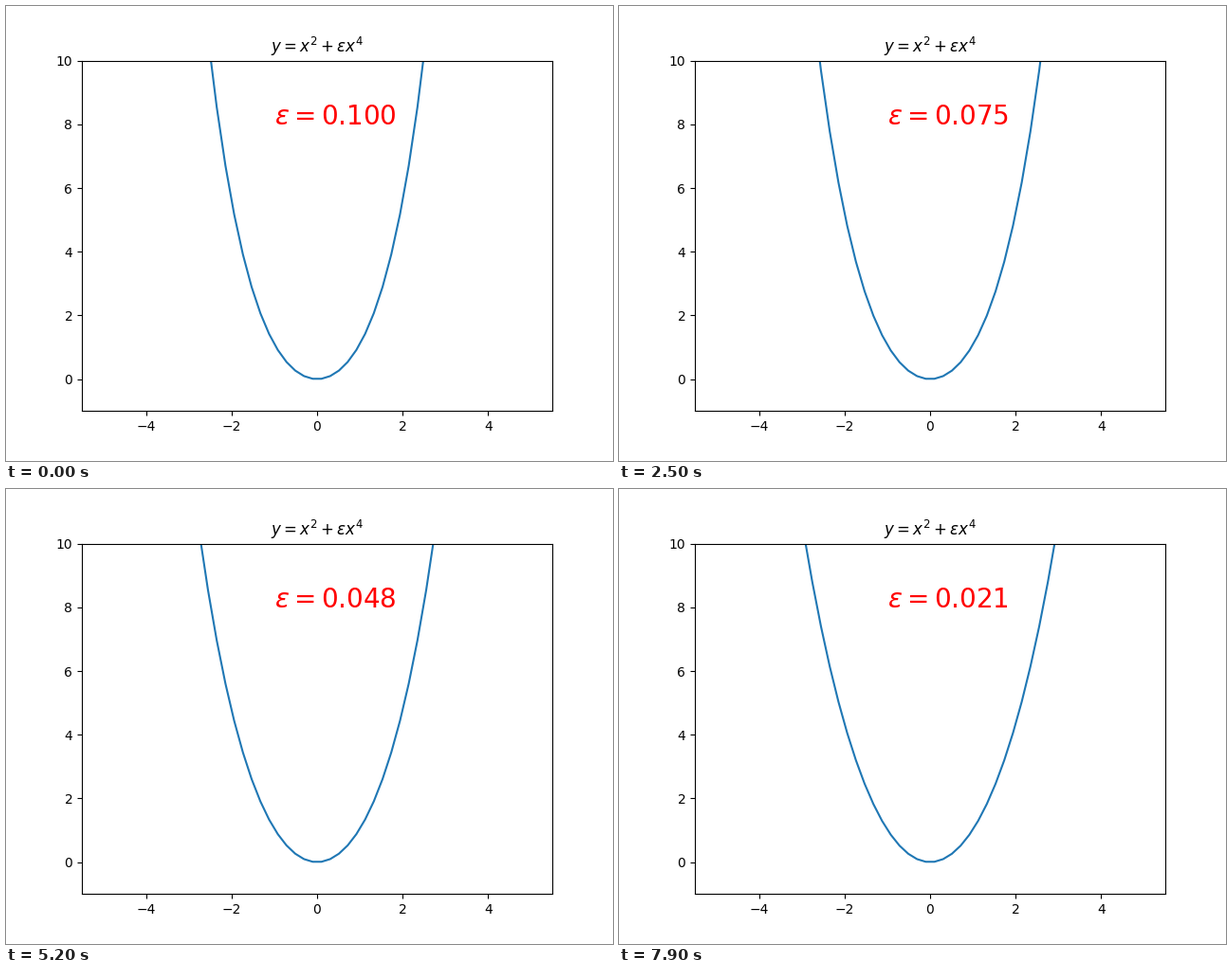
Animation, 640 px wide and 480 px high, one loop 8 s. Source, as a matplotlib script:

```python
import numpy as np
import matplotlib.pyplot as plt
from matplotlib.animation import FuncAnimation

FRAMES = 80
INTERVAL = 100  # ms

x = np.linspace(-5, 5, 50)

fig, ax = plt.subplots(figsize=(6.4, 4.8), dpi=100)
ax.set_xlim(-5.5, 5.5)
ax.set_ylim(-1, 10)
ax.set_title(r"$y = x^2 + \varepsilon x^4$")
curve, = ax.plot(x, x**2)
label = ax.text(-1, 8, "", fontsize=20, color="red")


def update(i):
    eps = 0.1 - 0.001 * i
    curve.set_ydata(x**2 + eps * x**4)
    label.set_text(rf"$\varepsilon = {eps:.3f}$")
    return curve, label


anim = FuncAnimation(fig, update, frames=FRAMES, interval=INTERVAL,
                     repeat=True, repeat_delay=0)
plt.show()
```
